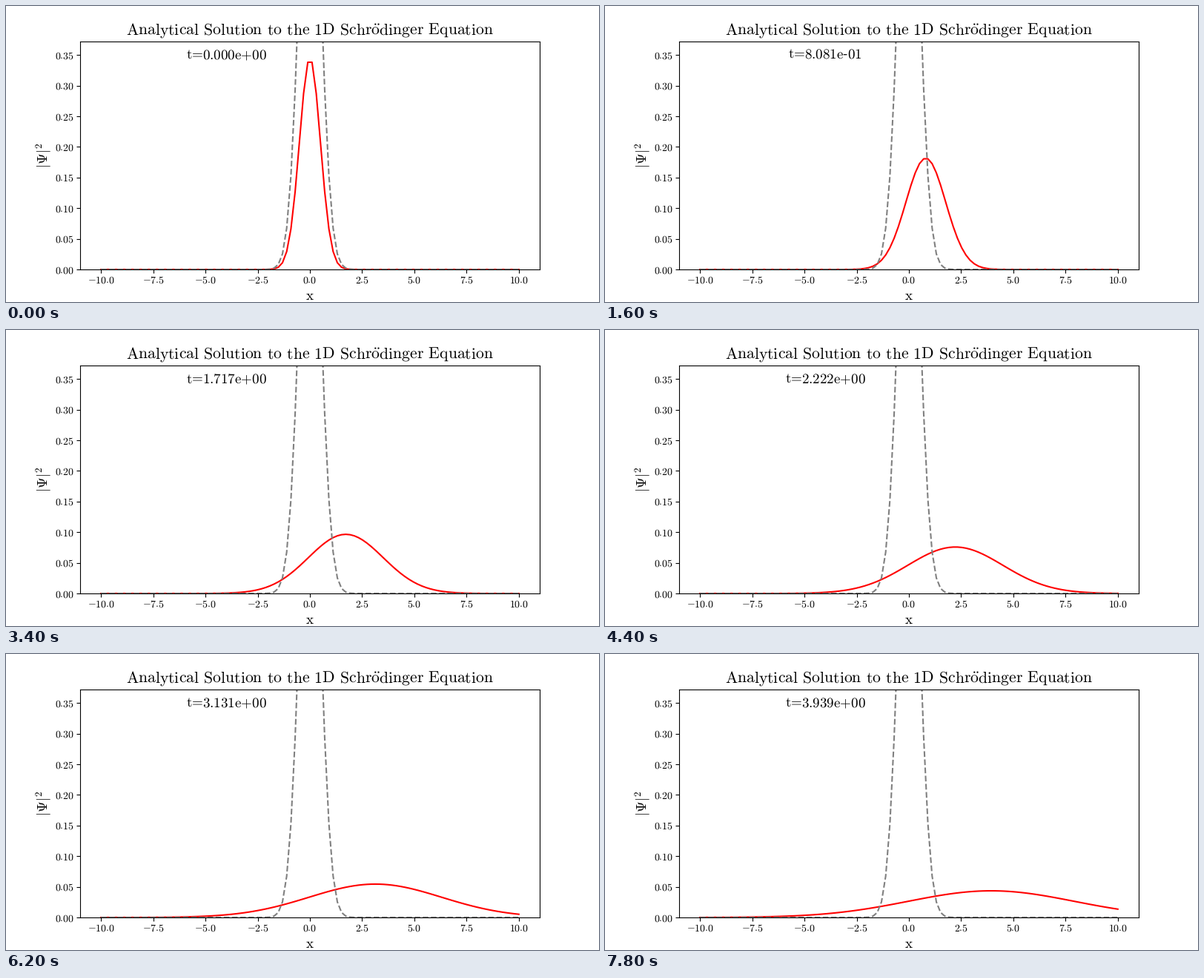
A matplotlib script for the animation above (8 s loop, 800x400 px).

```python
import numpy as np
import matplotlib.pyplot as plt
from matplotlib.animation import FuncAnimation
from matplotlib.ticker import FuncFormatter

plt.rcParams.update({
    "mathtext.fontset": "cm",
    "font.family": "Liberation Serif",
    "font.size": 10,
    "text.hinting": "none",
    "text.hinting_factor": 1,
})

FRAMES = 40
STEP_MS = 200
DT = 10 / 99
SPEED = 1.0
AMP = np.sqrt(np.pi) / 4 * np.exp(-0.25)

x = np.linspace(-10, 10, 100)


def roman(s):
    """Upright Computer Modern text."""
    return rf"$\text{{{s}}}$"


def density(t):
    """Free Gaussian packet, drifting and spreading."""
    spread = 1 + 4 * t**2
    return AMP / np.sqrt(spread) * np.exp(-2 * (x - SPEED * t)**2 / spread)


def clock(t):
    # a true hyphen, so that the exponent sign is not set as a minus
    return roman(f"t={t:.3e}".replace("-", "\u2010"))


fig, ax = plt.subplots(figsize=(8, 4), dpi=100)
fig.subplots_adjust(left=0.125, right=0.9, bottom=0.11, top=0.88)

packet, = ax.plot(x, density(0), color="red", lw=1.5)
ax.plot(x, np.sqrt(2 / np.pi) * np.exp(-2 * x**2), "--", color="gray", lw=1.5)

ax.set_xlim(-11, 11)
ax.set_ylim(0, 1.1 * density(0).max())
ax.set_xticks(np.arange(-10, 10.1, 2.5))
ax.set_yticks(np.arange(0, 0.36, 0.05))
ax.tick_params(pad=2.5)
ax.xaxis.set_major_formatter(FuncFormatter(lambda v, _: f"${v:.1f}$"))
ax.yaxis.set_major_formatter(FuncFormatter(lambda v, _: f"${v:.2f}$"))

ax.set_title(
    r"$\text{Analytical Solution to the 1D Schr}\mathrm{\ddot{o}}"
    r"\text{dinger Equation}$", fontsize=15.62, pad=6.7)
ax.set_xlabel(roman("x"), fontsize=13.7)
ax.set_ylabel(r"$|\Psi|^2$", fontsize=13.7, labelpad=2)
stamp = fig.text(297.3 / 800, 1 - 72 / 400, clock(0), fontsize=13.7,
                 ha="center", va="baseline")


def draw(i):
    t = i * DT
    packet.set_ydata(density(t))
    stamp.set_text(clock(t))
    return packet, stamp


anim = FuncAnimation(fig, draw, frames=FRAMES, interval=STEP_MS,
                     repeat=True, repeat_delay=0, blit=False)
plt.show()
```
